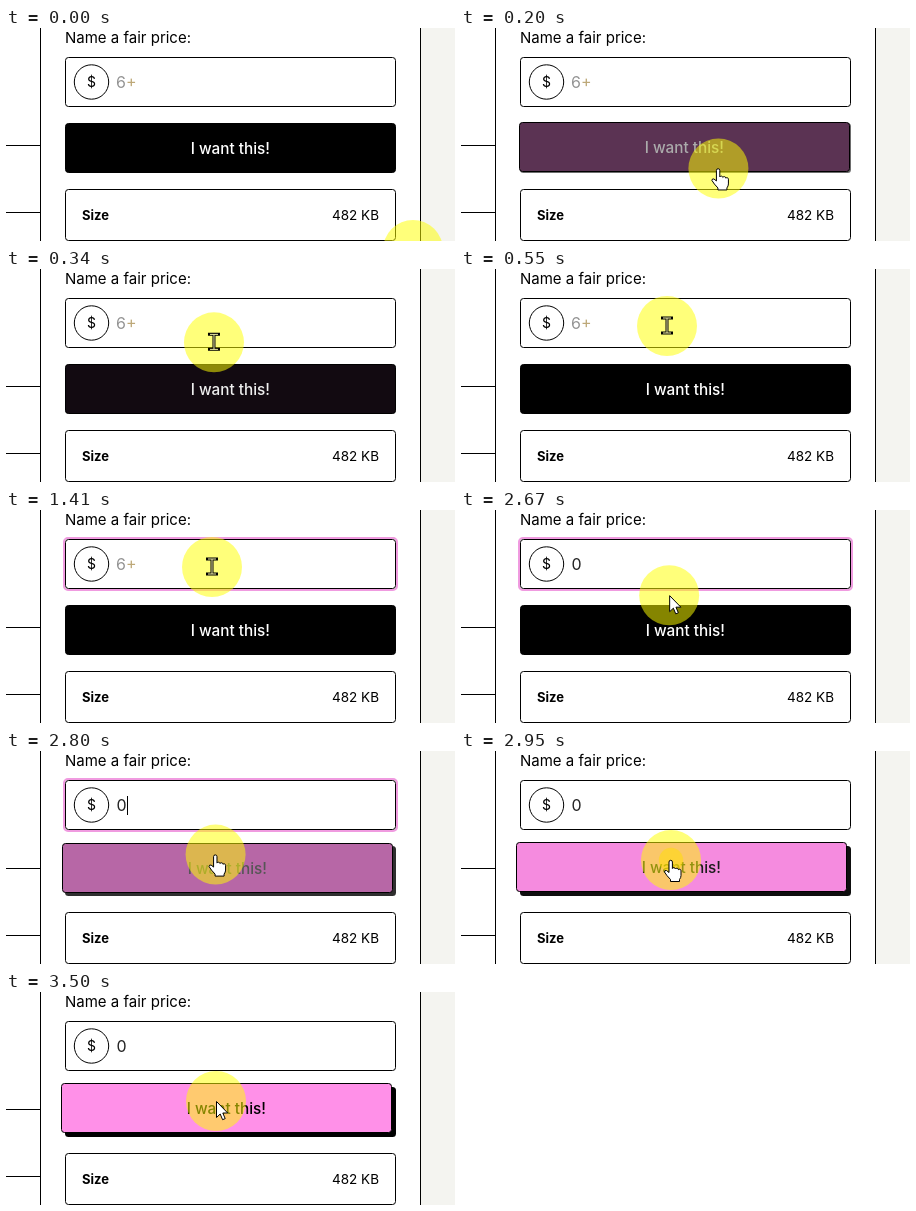
These frames come from a looping animation (449 px wide and 213 px high, 3630 ms). An HTML page:

```html
<!DOCTYPE html>
<html lang="en">
<head>
<meta charset="utf-8">
<title>Name a fair price</title>
<style>
  html, body { margin: 0; width: 100%; height: 100%; overflow: hidden; background: #fff; }
  svg { display: block; width: 449px; height: 213px; }
  text { font: 15px Inter, sans-serif; }
  .box { fill: #fff; stroke: #000; }
  .line { stroke: #000; fill: none; }
  .pointer { fill: #fff; stroke: #000; stroke-linejoin: round; }
  .value { font-size: 16px; }
  #label { font-size: 15.3px; font-weight: 500; }
</style>
</head>
<body>
<svg viewBox="0 0 449 213">
  <rect x="415" width="34" height="213" fill="#f4f4f0"/>
  <path class="line" d="M34.5 0V213M414.5 0V213M0 117.5H34M0 184.5H34"/>
  <text x="59" y="15">Name a fair price:</text>

  <rect id="ring" x="58" y="28" width="333" height="52" rx="4" fill="none" stroke="#f09be0" stroke-width="2"/>
  <rect class="box" x="59.5" y="29.5" width="330" height="49" rx="3"/>
  <circle class="box" cx="85.5" cy="54" r="17.2"/>
  <text x="85.5" y="59" text-anchor="middle" style="font-size:14px">$</text>
  <text id="placeholder" class="value" x="110" y="60" fill="#949494">6<tspan fill="#bda878">+</tspan></text>
  <text id="typed" class="value" x="110.5" y="60" fill="#222">0</text>
  <rect id="caret" y="45" width="1" height="19"/>

  <rect id="shadow" x="59" y="95" width="331" height="50" rx="3.5"/>
  <g id="button">
    <rect id="face" x="59.5" y="95.5" width="330" height="49" rx="3" stroke="#000"/>
    <text id="label" x="224.3" y="126" text-anchor="middle">I want this!</text>
  </g>

  <rect class="box" x="59.5" y="161.5" width="330" height="51" rx="3"/>
  <text x="76" y="192" style="font-size:13px;font-weight:700">Size</text>
  <text x="373" y="192" text-anchor="end" style="font-size:13.5px">482 KB</text>

  <g id="cursor">
    <circle r="30" fill="#ff0" fill-opacity=".52"/>
    <circle id="ripple" fill="#ffe000" fill-opacity=".5"/>
    <g id="beam" fill="none" transform="translate(0 -.5)">
      <path d="M-6 -7.5H6M0 -7.5V7.5M-6 7.5H6" stroke="#000" stroke-width="3"/>
      <path d="M-4 -7.5H4M0 -7.5V7.5M-4 7.5H4" stroke="#f3f0a8"/>
    </g>
    <path id="hand" class="pointer" transform="translate(-.5 .5)" d="M-1.5 12V1.5a1.7 1.7 0 0 1 3.4 0V8a1.6 1.6 0 0 1 3 .5a1.6 1.6 0 0 1 3 .7a1.5 1.5 0 0 1 2.6 1V15q0 2-1.5 4v2H0V19Q-4 15-6 11.5q0-2 2-1.5Z"/>
    <path id="arrow" class="pointer" d="M.5 .5V16.5L4.2 13L6.6 18.7L9.2 17.6L6.8 12H11.7Z"/>
  </g>
</svg>
<script>
const LOOP = 3630, STEP = 68, BLINK = 530;
const FOCUS = 880, TYPE = 1740, CLICK = 2880, LOADING = 3500;

const el = id => document.getElementById(id);
const show = (id, on) => el(id).setAttribute('visibility', on ? 'visible' : 'hidden');
const set = (id, attrs) => {
  for (const name in attrs) el(id).setAttribute(name, attrs[name]);
};
const rgb = (...c) => `rgb(${c.map(Math.round)})`;
const mix = (a, b, p) => a + (b - a) * p;
const progress = (t, start, end) => Math.min(1, Math.max(0, (t - start) / (end - start)));
const easeOut = (p, power) => 1 - (1 - p) ** power;
const smooth = p => p * p * (3 - 2 * p);

function snap(now) {
  const origin = now < FOCUS ? 0 : 2800;
  return origin + Math.floor((now - origin) / STEP) * STEP;
}

function cursorAt(t) {
  const arrive = progress(t, 0, 550);
  const leave = smooth(progress(t, 2400, 2900));
  return [
    mix(407, 206, easeOut(arrive, 4.8)) + 4 * leave,
    mix(222, 57, easeOut(arrive, 2.4)) + 52 * leave
  ];
}

// Rises quickly while the pointer is over the button, then fades out.
function hoverPulse(t, enter, exit) {
  const age = Math.max(0, Math.min(t, exit) - enter);
  const fade = Math.exp(-Math.max(0, t - exit) / 40);
  return Math.min(1, 1.05 * age / (age + 35)) * fade;
}

function drawField(t) {
  const focused = t >= FOCUS && t < CLICK;
  const typed = t >= TYPE;
  const blinkAge = t - (typed ? TYPE : FOCUS);
  show('ring', focused);
  show('placeholder', !typed);
  show('typed', typed);
  show('caret', focused && Math.floor(blinkAge / BLINK) % 2 === 0);
  set('caret', { x: typed ? 121 : 111 });
}

function drawButton(t) {
  const hover = hoverPulse(t, 120, 240) + hoverPulse(t, 2740, LOOP);
  const tint = Math.min(1, hover * 1.08);
  const ink = 255 * (1 - hover);
  const lift = -Math.round(4 * hover);
  set('button', { transform: `translate(${lift} ${lift})` });
  set('shadow', { opacity: Math.sqrt(hover) });
  set('face', { fill: rgb(255 * tint, 144 * tint, 232 * tint) });
  set('label', { fill: rgb(ink, ink, ink) });
}

function drawCursor(t, now) {
  const [x, y] = cursorAt(t);
  const overField = y > 29 && y < 79;
  const overButton = y >= 95 && y < 145 && now < LOADING;
  set('cursor', { transform: `translate(${x} ${y})` });
  show('beam', overField);
  show('hand', overButton);
  show('arrow', !overField && !overButton);

  const age = now - (now < CLICK ? FOCUS : CLICK);
  show('ripple', age > 0 && age < 150);
  set('ripple', { r: 30 * progress(age, 0, 175) });
}

function frame() {
  const now = performance.now() % LOOP;
  const t = snap(now);
  drawField(now);
  drawButton(t);
  drawCursor(t, now);
  requestAnimationFrame(frame);
}
frame();
</script>
</body>
</html>
```
